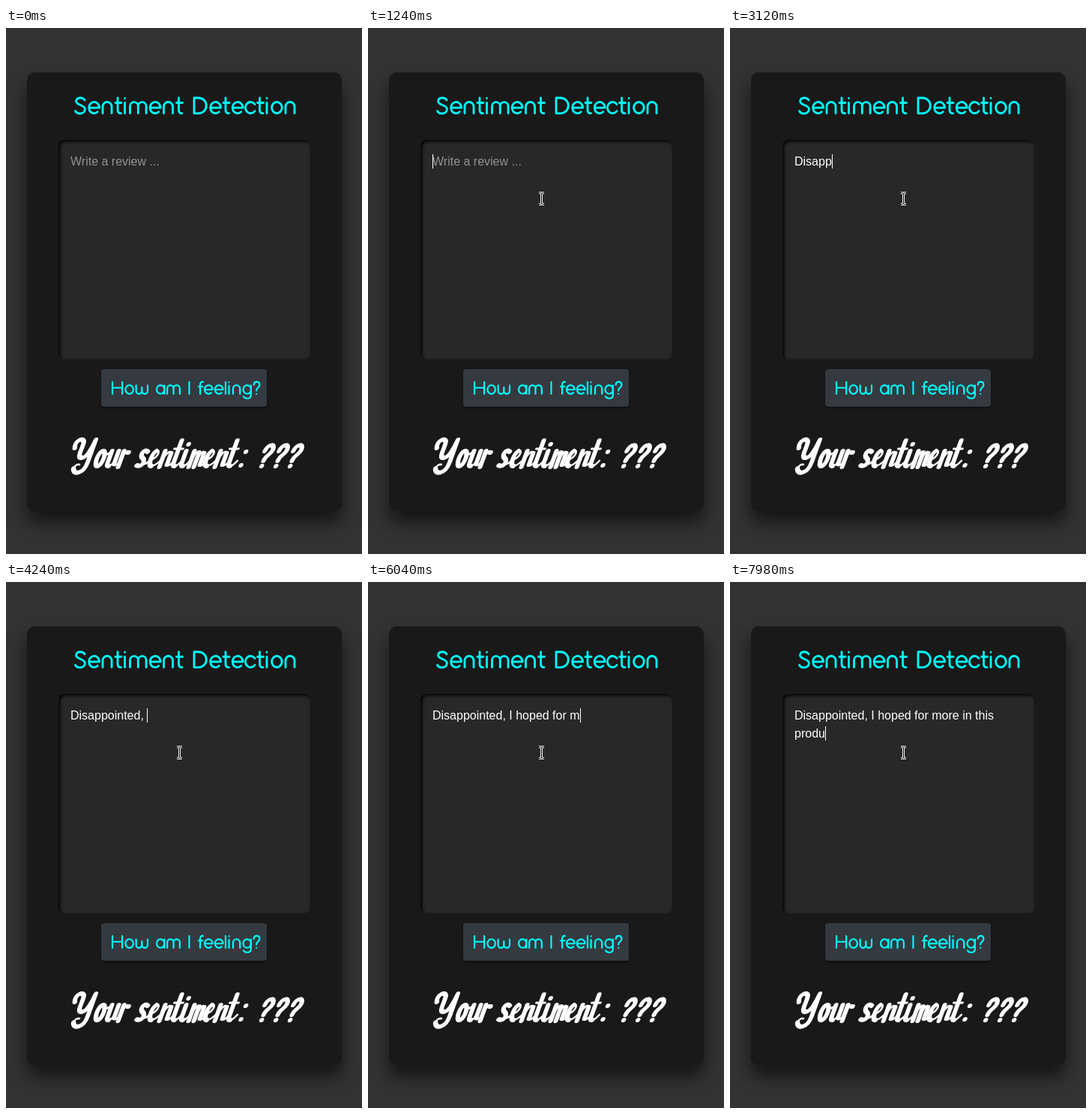
An HTML page that plays this animation: 475 px wide and 700 px high, repeating every 8000 ms.

```html
<!DOCTYPE html>
<html lang="en">
<head>
<meta charset="utf-8">
<title>Sentiment Detection</title>
<style>
  html, body { margin: 0; width: 100%; height: 100%; overflow: hidden; background: #333; }
  div, svg { position: absolute; }
  #card { left: 28px; top: 59px; width: 420px; height: 584px; border-radius: 10px;
    background: #191919; box-shadow: 0 15px 25px rgba(0, 0, 0, .6); }
  #field { left: 70px; top: 149px; width: 336px; height: 292px; border-radius: 8px;
    background: #282828; box-shadow: inset 2px 2px 4px #000; }
  #button { left: 127px; top: 454px; width: 221px; height: 50px; border-radius: 4px;
    background: #343a40; box-shadow: 0 2px 3px rgba(0, 0, 0, .4); }
  svg { left: 0; top: 0; }
  text { font: 16px "Liberation Sans", Arial, sans-serif; fill: #fff; white-space: pre; }
  .letters path { fill: none; stroke-linecap: round; stroke-linejoin: round; }
</style>
</head>
<body>
<div id="card"></div>
<div id="field"></div>
<div id="button"></div>
<svg width="475" height="700" viewBox="0 0 475 700">
  <g id="lettering"></g>
  <text id="line1" x="86" y="183"></text>
  <text id="line2" x="86" y="207"></text>
  <rect id="caret" width="1" height="19" fill="#fff"/>
  <g id="cursor" stroke-linejoin="round">
    <g id="ibeam" fill="none">
      <path d="M-3.5-7.5H-1Q0-7.5 0-6V6Q0 7.5-1 7.5H-3.5M3.5-7.5H1Q0-7.5 0-6V6Q0 7.5 1 7.5H3.5" stroke="#fff" stroke-width="3"/>
      <path d="M-3.5-7.5H-1Q0-7.5 0-6V6Q0 7.5-1 7.5H-3.5M3.5-7.5H1Q0-7.5 0-6V6Q0 7.5 1 7.5H3.5" stroke="#000"/>
    </g>
    <path id="arrow" d="M0 0V14L3.5 11L6 16.5L8 15.5L5.7 10.3H10Z" stroke="#fff"/>
    <path id="hand" d="M-1.5 0H1V6H8Q9 6 9 8V12L7 17H-2L-6 10L-4 8L-1.5 10Z" stroke="#fff"/>
  </g>
</svg>
<script>
const LOOP = 8000;
const $ = id => document.getElementById(id);

// Each glyph: advance, main strokes, optional hairlines; baseline at y = 0.
const ROUND = {
  ' ': [11, ''],
  S: [18, 'M14-19C12-23 3-23.5 2.6-17.5C2.5-12 14.4-13 14.4-7C14 0 4 .5 1.5-4.5'],
  D: [22, 'M2-1.4V-22H8A10.3 10.3 0 0 1 8-1.4Z'],
  H: [23, 'M2-22V-1.4M19-22V-1.4M2-12H19'],
  I: [6, 'M2-22V-1.4'],
  a: [18, 'M15-9A6.7 7.4 0 1 0 1.6-9A6.7 7.4 0 1 0 15-9M15-16V-1.4'],
  c: [16, 'M13.5-13.5A7 7.5 0 1 0 13.5-4.5'],
  e: [18, 'M2-8.8H15.6A7 7.5 0 1 0 13.3-3.4'],
  f: [10, 'M9-22Q4-23 4-17V-1.4M1-14H8.5'],
  g: [18, 'M15-9A6.7 7.4 0 1 0 1.6-9A6.7 7.4 0 1 0 15-9M15-16V0Q15 6.5 8.5 6.5Q4 6.5 2 3'],
  i: [7, 'M2-15.5V-1.4M2-21.5h.01'],
  l: [6, 'M2-22V-1.4'],
  m: [27, 'M2-1.4V-11A5.4 5.4 0 0 1 12.8-11V-1.4M12.8-11A5.4 5.4 0 0 1 23.6-11V-1.4'],
  n: [18, 'M2-1.4V-10.5A6 6 0 0 1 14-10.5V-1.4'],
  o: [18, 'M15.2-9A6.8 7.5 0 1 0 1.6-9A6.8 7.5 0 1 0 15.2-9'],
  t: [11.5, 'M4-22V-6Q4-1.4 8.5-1.4M1-15.5H9'],
  w: [25, 'M2-16V-7A5 5.6 0 0 0 12-7V-13M12-7A5 5.6 0 0 0 22-7V-16'],
  '?': [13, 'M2-17C2-24 12-24 12-17C12-12 6.5-13 6.5-7M6.5-1.4h.01']
};
const SCRIPT = {
  ' ': [13, ''],
  Y: [27, 'M-6-27C-10-37 0-42 3-35C5-28 0-14 8-14C14-14 17-27 18-38V-8C18 8 5 9 2 0', 'M2 0Q3-6 8-5'],
  o: [15, 'M6-23C0-23 0-3 6-3C12-3 12-23 6-23', 'M9-21Q12-16 17-22'],
  u: [16, 'M3-23V-7Q3-3 6-3M12-23V-6', 'M6-3Q10-4 12-12M12-6Q13-1 18-8'],
  r: [13, 'M3-23V-2M9-21h1', 'M3-14Q7-27 10-21'],
  s: [15, 'M9-22C2-27 0-17 5-14C12-9 8-1 1-4', 'M8-6Q13-5 16-11'],
  e: [14, 'M5-23C0-18 1-3 6-3', 'M2-11Q9-14 9-20Q8-26 4-22M6-3Q10-3 15-10'],
  n: [17, 'M3-23V-2M12-20V-5', 'M3-10Q8-27 12-20M12-5Q14-1 19-9'],
  m: [21, 'M3-23V-2M10-21V-2M17-20V-5', 'M3-10Q7-27 10-20M10-10Q14-27 17-20M17-5Q19-1 23-8'],
  t: [11, 'M3-37V-7Q3-3 6-3', 'M-3-26H9M6-3Q9-3 13-10'],
  i: [11, 'M3-23V-7Q3-3 6-3M3-32h.1', 'M6-3Q9-3 13-10'],
  ':': [20, 'M9-4h.1M9-22h.1'],
  '?': [19, 'M1-23C2-33 12-33 11-24C10-18 4-17 4-10M4-3h.1']
};

function letters(str, font, color, weight, thin, transform) {
  let x = 0, body = '';
  for (const ch of str) {
    const [advance, main, hair = ''] = font[ch];
    body += `<g transform="translate(${x})"><path d="${main}" stroke-width="${weight}"/>` +
      `<path d="${hair}" stroke-width="${thin}"/></g>`;
    x += advance;
  }
  return `<g class="letters" role="img" aria-label="${str}" stroke="${color}" transform="${transform}">${body}</g>`;
}
$('lettering').innerHTML =
  letters('Sentiment Detection', ROUND, '#0ff', 2.8, 0, 'translate(91 115)') +
  letters('How am I feeling?', ROUND, '#0ff', 2.8, 0, 'translate(140.5 488) scale(.77)') +
  letters('Your sentiment: ???', SCRIPT, '#fff', 6, 2.8, 'translate(88 586) skewX(-20)');

const REVIEW = 'Disappointed, I hoped for more in this produ';
const KEY_TIMES = [2190, 2580, 2720, 2880, 2960, 3120, 3280, 3360, 3450, 3580, 3770,
  3950, 4040, 4240, 4560, 4670, 4880, 4990, 5170, 5280, 5500, 5590, 5680, 5770, 5860,
  5950, 6040, 6220, 6265, 6310, 6720, 6890, 6970, 7050, 7140, 7230, 7320, 7410, 7500,
  7590, 7680, 7790, 7880, 7980];
const FOCUS = 1080, FIELD_WIDTH = 304;
const POINTER = [[340, 459, 455], [420, 345, 470], [500, 290, 458], [580, 258, 330],
  [660, 242.5, 234], [740, 231.5, 227]];

const pen = document.createElement('canvas').getContext('2d');
pen.font = '16px "Liberation Sans", Arial, sans-serif';
const widthOf = str => pen.measureText(str).width;
const clamp = v => Math.max(0, Math.min(1, v));
const mix = (a, b, k) => a + (b - a) * k;
const show = (el, on) => el.setAttribute('visibility', on ? 'visible' : 'hidden');

function pointerAt(t) {
  const time = Math.min(740, 340 + Math.floor((t - 340) / 40) * 40);
  const i = Math.max(1, POINTER.findIndex(p => p[0] >= time));
  const [a, b] = [POINTER[i - 1], POINTER[i]];
  const k = (time - a[0]) / (b[0] - a[0]);
  return [mix(a[1], b[1], k), mix(a[2], b[2], k)];
}

function drawPointer(t) {
  const [x, y] = pointerAt(t), on = t >= 340;
  const inField = x > 70 && x < 406 && y > 149 && y < 441;
  const inButton = x > 127 && x < 348 && y > 454 && y < 504;
  $('cursor').setAttribute('transform', `translate(${x} ${y})`);
  show($('ibeam'), on && inField);
  show($('hand'), on && inButton);
  show($('arrow'), on && !inField && !inButton);
}

function drawReview(t) {
  const typed = REVIEW.slice(0, KEY_TIMES.filter(k => k <= t).length);
  const wraps = widthOf(typed) > FIELD_WIDTH;
  const cut = wraps ? typed.lastIndexOf(' ') + 1 : typed.length;
  const rest = typed.slice(cut);
  $('line1').textContent = typed.slice(0, cut) || 'Write a review ...';
  $('line1').style.fill = typed ? '#fff' : '#929292';
  $('line2').textContent = rest;
  $('caret').setAttribute('x', Math.round(86 + widthOf(wraps ? rest : typed)));
  $('caret').setAttribute('y', wraps ? 192 : 168);
  show($('caret'), t >= FOCUS);
}

function render(t) {
  const tint = clamp((t - 400) / 150) - clamp((t - FOCUS) / 150);
  const channels = [[52, 44], [58, 52], [64, 59]].map(([a, b]) => mix(a, b, tint));
  $('button').style.background = `rgb(${channels})`;
  drawPointer(t);
  drawReview(t);
}

const start = performance.now();
function tick() {
  render((performance.now() - start) % LOOP);
  requestAnimationFrame(tick);
}
tick();
</script>
</body>
</html>
```
